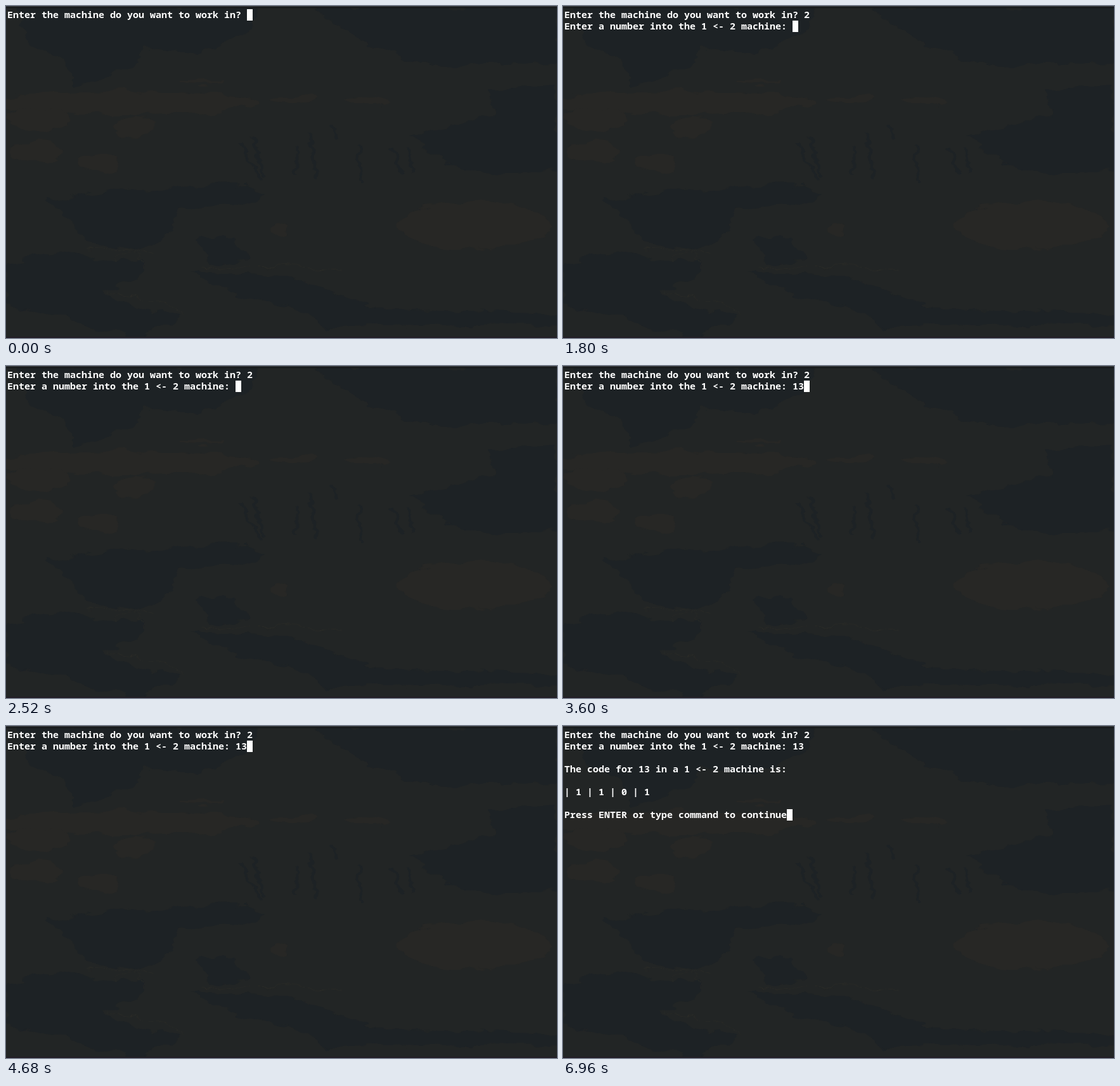
Animation, 869 px wide and 523 px high, one loop 8 s. Source, as an HTML page:

```html
<!DOCTYPE html>
<html lang="en">
<head>
<meta charset="utf-8">
<title>Exploding dots terminal</title>
<style>
html, body { margin: 0; width: 100%; height: 100%; overflow: hidden; background: #222525; }
svg { display: block; width: 100vw; height: 100vh; }
text { font: 600 15px "Noto Sans Mono", "DejaVu Sans Mono", monospace; fill: #fff; white-space: pre; font-variant-ligatures: none; }
</style>
</head>
<body>
<svg viewBox="0 0 869 523">
  <defs>
    <filter id="ragged" x="0" y="0" width="869" height="523" filterUnits="userSpaceOnUse" color-interpolation-filters="sRGB">
      <feTurbulence type="fractalNoise" baseFrequency=".025 .06" numOctaves="3" seed="4"/>
      <feDisplacementMap in="SourceGraphic" scale="22" xChannelSelector="R" yChannelSelector="G"/>
    </filter>
  </defs>
  <rect width="869" height="523" fill="#222525"/>
  <g filter="url(#ragged)">
    <g fill="#1d2225">
      <path d="M20 0H400L390 35 300 75 215 65 200 95 110 125 90 80 30 55Z"/>
      <path d="M480 0H869V90L650 92 560 55Z"/>
      <path d="M635 205L770 175 760 130 869 125V260L720 262Z"/>
      <path d="M65 305L170 290 380 280 410 300 365 312 270 320 260 360 215 385 130 370Z"/>
      <path d="M0 402L110 385 170 405 215 400 210 430 150 450 210 475 280 490 200 523 0 470Z"/>
      <path d="M290 420L430 425 500 445 600 478 869 485V500L500 505 460 475 350 450Z"/>
      <path d="M305 365L360 365 380 400 320 408Z"/>
    </g>
    <path d="M370 215L405 278M390 205L408 270M478 200L490 272M460 220V270M515 190L520 205M556 220L560 275M605 222L622 265M633 220L640 260" stroke="#1d2225" stroke-width="5"/>
    <g id="clouds" fill="#272725"></g>
    <path d="M130 384Q180 378 230 394M172 405Q194 375 214 405M160 450Q240 455 285 488M305 415Q400 408 530 415" fill="none" stroke="#292a27"/>
  </g>
  <rect width="869" height="2" fill="#303335"/>
  <rect y="2" width="869" height="1" fill="#090b0c"/>
  <rect y="521" width="869" height="2" fill="#211d25"/>
  <g id="lines"></g>
  <rect id="cursor" width="9" height="18" fill="#fff"/>
</svg>
<script>
const SVG = "http://www.w3.org/2000/svg";
const LOOP = 8000, CELL = 9, ROW = 18, LEFT = 2, TOP = 5;
const byId = id => document.getElementById(id);

function add(parent, tag, attrs) {
  const node = document.createElementNS(SVG, tag);
  for (const key in attrs) node.setAttribute(key, attrs[key]);
  return parent.appendChild(node);
}

// Cloud centre and radii.
[[190, 153, 210, 18], [50, 177, 48, 18], [205, 190, 34, 16], [48, 230, 42, 16],
 [148, 248, 34, 15], [740, 345, 120, 38], [570, 149, 36, 8], [310, 120, 35, 3],
 [453, 147, 34, 5], [430, 352, 13, 8]]
  .forEach(([cx, cy, rx, ry]) => add(byId("clouds"), "ellipse", { cx, cy, rx, ry }));

const firstPrompt = "Enter the machine do you want to work in? ";
const secondPrompt = firstPrompt + "2\nEnter a number into the 1 <- 2 machine: ";
const steps = [
  [0, firstPrompt],
  [1050, firstPrompt + "2"],
  [1800, secondPrompt],
  [3000, secondPrompt + "1"],
  [3600, secondPrompt + "13"],
  [5400, secondPrompt + "13\n\nThe code for 13 in a 1 <- 2 machine is:\n\n| 1 | 1 | 0 | 1\n\nPress ENTER or type command to continue"]
];

const rows = Array.from({ length: 8 }, (_, i) =>
  add(byId("lines"), "text", { x: LEFT, y: TOP + 14 + i * ROW }));
let shown;

function draw(time) {
  const screen = steps.findLast(([start]) => start <= time)[1];
  if (screen === shown) return;
  shown = screen;
  const lines = screen.split("\n");
  rows.forEach((row, i) => { row.textContent = lines[i] || ""; });
  byId("cursor").setAttribute("x", LEFT + lines.at(-1).length * CELL);
  byId("cursor").setAttribute("y", TOP + (lines.length - 1) * ROW);
}

const began = performance.now();
function tick() {
  draw((performance.now() - began) % LOOP);
  requestAnimationFrame(tick);
}
tick();
</script>
</body>
</html>
```
